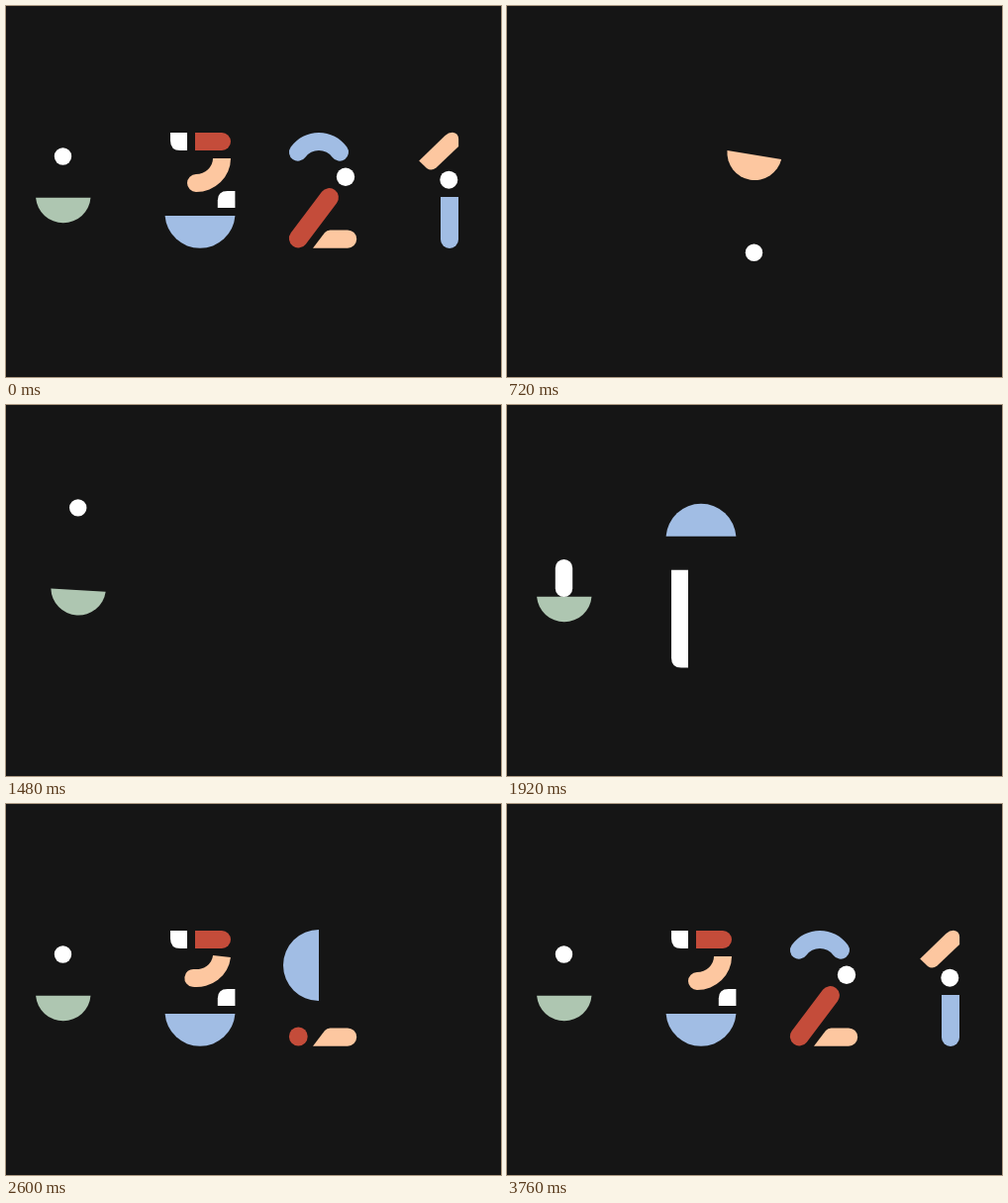
These frames come from a looping animation (500 px wide and 375 px high, 3.8 s). An HTML page:

```html
<!DOCTYPE html>
<html lang="en">
<head>
<meta charset="utf-8">
<title>Countdown shapes</title>
<style>
  html, body { margin: 0; width: 100%; height: 100%; overflow: hidden; background: #151515; }
  svg { display: block; width: 100%; height: 100%; }
  .white { fill: #fff; }
  .green { fill: #aec6b1; }
  .peach { fill: #fdc7a0; }
  .blue { fill: #a1bde4; }
  .red { fill: #c44c3a; }
</style>
</head>
<body>
<svg viewBox="0 0 500 375">
  <path id="bowl" d="M-27.7 0H27.7A27.8 27.8 0 0 1 -27.7 0Z"/>
  <rect id="ball" class="white"/>

  <path id="base3" class="blue" d="M-35.4 0H35.4A35.5 35.5 0 0 1 -35.4 0Z"/>
  <path id="corner" class="white"/>
  <path id="bar3" class="red"/>
  <path id="hook" class="peach" d="M9 0A35 34 0 0 1 -26 34A9 9 0 0 1 -26 16A17 16 0 0 0 -9 0Z"/>
  <path id="notch" class="white" d="M8.8 8.5V-8.5H1Q-8.8 -8.5 -8.8 1V8.5Z"/>

  <path id="foot" class="peach" d="M310 244.8L322 229Q324 226.4 327.5 226.4H345A9.2 9.2 0 0 1 345 244.8Z"/>
  <line id="slash" stroke="#c44c3a" stroke-width="18.8" stroke-linecap="round"/>
  <path id="arch" class="blue"/>
  <circle id="dot2" class="white"/>

  <path id="stem" class="blue"/>
  <ellipse id="dot1" class="white"/>
  <path id="arm" class="peach" d="M-20.3 10L6 -15.5Q9.5 -18.8 13.5 -18.8Q19.6 -18 19.6 -12V-4.5L-3 17Q-8 20.8 -12.5 17.5Z"/>
</svg>
<script>
const LOOP = 3800, STEP = 40, { PI, sin, cos, exp, min, max } = Math;
const el = {};
document.querySelectorAll("svg [id]").forEach(n => el[n.id] = n);

const set = (id, attrs) => {
  for (const k in attrs) el[id].setAttribute(k, attrs[k]);
};
const show = (id, on) => set(id, { visibility: on ? "visible" : "hidden" });
const place = (id, x, y, rot = 0, scale = 1) =>
  set(id, { transform: `translate(${x} ${y}) rotate(${rot}) scale(${scale})` });

// Timing helpers: each runs from time a to time b.
const mix = (from, to, u) => from + (to - from) * u;
const part = (t, a, b) => min(1, max(0, (t - a) / (b - a)));
const ease = (t, a, b) => (1 - cos(PI * part(t, a, b))) / 2;
const easeIn = (t, a, b) => part(t, a, b) ** 2;
const easeOut = (t, a, b) => 1 - (1 - part(t, a, b)) ** 2;
const bump = (t, a, b) => sin(PI * part(t, a, b));

// Half disc (m = 0) turning into a round-ended band (m = 1).
function archPath(m) {
  const R = 36 - m, r = max(17 * m, 0.01), half = 90 - 36 * m;
  const w = (R - r) / 2, cap = max(9 * m, 0.01);
  const pt = (d, deg) => {
    const a = (deg - 90) * PI / 180;
    return `${d * cos(a)} ${d * sin(a)}`;
  };
  return `M${pt(R, -half)}A${R} ${R} 0 0 1 ${pt(R, half)}`
    + `A${w} ${cap} ${half - 90} 0 1 ${pt(r, half)}`
    + `A${r} ${r} 0 0 0 ${pt(r, -half)}`
    + `A${w} ${cap} ${-half - 90} 0 1 ${pt(R, -half)}Z`;
}

// Ball and bowl swing in opposite phase, then travel left and settle.
function drawPair(t) {
  const wave = cos((min(t, 1160) - 131) / 253);
  const x = mix(249.5, 57.5, ease(t, 1120, 1560));

  let y = mix(166.5 - 120.5 * wave, 87, easeOut(t, 1160, 1640));
  y = mix(y, 175, easeIn(t, 1640, 1840));
  y = mix(y, 152, ease(t, 1920, 2160));
  const h = 17.4 + 20.6 * bump(t, 1800, 2040);
  set("ball", { x: x - 8.7, y: y - h / 2, width: 17.4, height: h, rx: 8.7 });

  const bowlY = mix(186 + 51.6 * wave, 193.8, ease(t, 1160, 1600));
  const tilt = mix(mix(-1.5, 20, ease(t, 400, 1040)), 0, ease(t, 1160, 1600));
  place("bowl", x + 0.3, bowlY, tilt);
  set("bowl", { class: y > bowlY ? "peach" : "green" });
}

function drawThree(t) {
  show("base3", t >= 1680);
  place("base3", 196, mix(112, 212, easeIn(t, 1720, 2160)),
    180 * (1 + ease(t, 1920, 2160)), ease(t, 1640, 1800));

  const top = mix(248, 128, ease(t, 1760, 2020));
  const bottom = mix(265.5, 146, ease(t, 1920, 2160));
  show("corner", t >= 1760);
  set("corner", { d: `M166 ${top}H183V${bottom}H176Q166 ${bottom} 166 ${bottom - 10}Z` });

  const end = mix(192, 218, part(t, 2000, 2240)) + 110 * bump(t, 2000, 2240);
  show("bar3", t >= 2040);
  set("bar3", { d: `M191 128H${end}A9 9 0 0 1 ${end} 146H191Z` });

  const age = t - 2200;
  show("hook", age >= 0);
  place("hook", 218, 154, -60 * exp(-age / 180) * cos(PI * age / 400), ease(t, 2160, 2360));

  show("notch", t >= 2160);
  place("notch", mix(258, 222.6, ease(t, 2160, 2360)), 195.5, 0, ease(t, 2120, 2320));
}

function drawTwo(t) {
  show("foot", t >= 2280);
  place("foot", 150 * (1 - easeOut(t, 2260, 2520)), 0);

  const grow = ease(t, 2600, 2800), y = mix(264, 235, ease(t, 2360, 2520));
  show("slash", t >= 2360);
  set("slash", { x1: 295.3, y1: y, x2: 295.31 + 31.2 * grow, y2: y - 41.5 * grow });

  show("arch", t >= 2360);
  set("arch", { d: archPath(ease(t, 2640, 2800)) });
  place("arch", 316, 163, -90 * (1 - ease(t, 2600, 2800)), ease(t, 2320, 2500));

  const p = ease(t, 2720, 2880);
  show("dot2", p > 0);
  set("dot2", { cx: 327 + 16 * p, cy: 193 - 20.3 * p, r: 9.2 * p });
}

function drawOne(t) {
  const squash = bump(t, 3080, 3240);
  const top = mix(236, 193, ease(t, 2840, 3040)) + 6 * squash;
  show("stem", t >= 2880);
  set("stem", { d: `M439 ${top}H457V236A9 9 0 0 1 439 236Z` });

  const size = ease(t, 2920, 3040);
  const y = mix(mix(120, 193, easeIn(t, 2960, 3160)), 175.7, ease(t, 3160, 3320));
  show("dot1", t >= 2960);
  set("dot1", { cx: 447.3, cy: y, rx: (9 + 3.5 * squash) * size, ry: (9 - 3 * squash) * size });

  const land = ease(t, 3160, 3360);
  const spin = mix(105, 0, land) + 90 * (1 - ease(t, 3000, 3160));
  show("arm", t >= 3000);
  place("arm", mix(443, 437.5, land), mix(121.7, 146.5, land), spin, ease(t, 2980, 3120));
}

function draw(ms) {
  const s = Math.floor((ms % LOOP) / STEP) * STEP;
  const t = s || LOOP; // the loop opens on the finished picture
  drawPair(t);
  drawThree(t);
  drawTwo(t);
  drawOne(t);
}

const start = performance.now();
function tick() {
  draw(performance.now() - start);
  requestAnimationFrame(tick);
}
tick();
</script>
</body>
</html>
```
